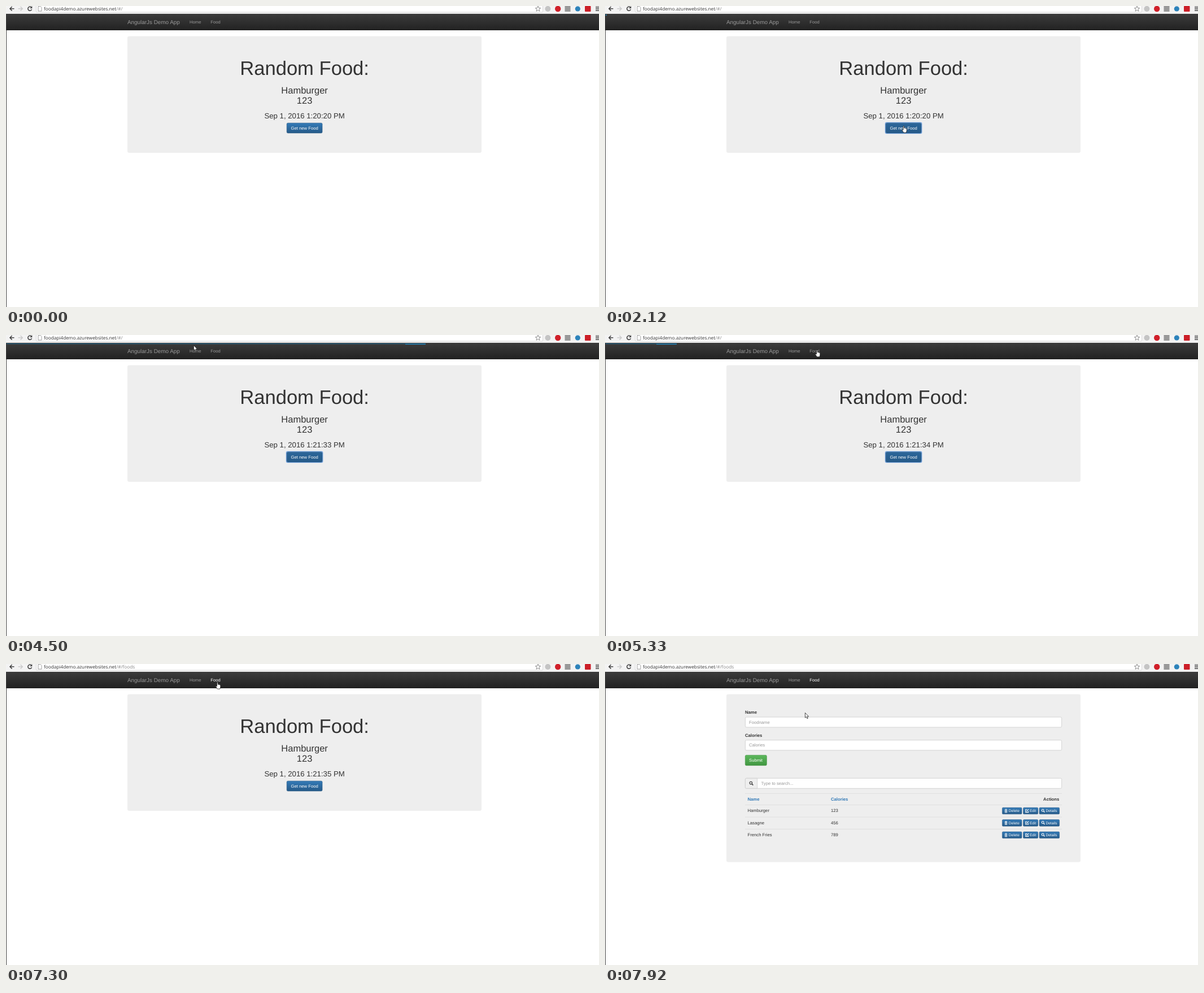
An HTML page that plays this animation: 1050 px wide and 533 px high, repeating every 8 s.

```html
<!DOCTYPE html>
<html lang="en">
<head>
<meta charset="utf-8">
<title>Food demo</title>
<style>
html, body { margin: 0; width: 100%; height: 100%; overflow: hidden; background: #fff; }
svg { display: block; width: 100%; height: 100%; }
text { font: 7.7px "Liberation Sans", Arial, sans-serif; fill: #333; text-rendering: geometricPrecision; white-space: pre; }
.url { font: 8.24px "Open Sans", sans-serif; }
.dim { fill: #999; }
.mid { text-anchor: middle; }
.end { text-anchor: end; }
.bold { font-weight: bold; }
.link { fill: #337ab7; }
.light { fill: #fff; }
.mini { font-size: 6.6px; fill: #fff; }
.field { fill: #fff; stroke: #ccc; stroke-width: .8; }
</style>
</head>
<body>
<svg viewBox="0 0 1050 533" xmlns="http://www.w3.org/2000/svg">
  <defs>
    <linearGradient id="nav" x2="0" y2="1"><stop stop-color="#3c3c3c"/><stop offset="1" stop-color="#222"/></linearGradient>
    <linearGradient id="blue" x2="0" y2="1"><stop stop-color="#337ab7"/><stop offset="1" stop-color="#265a88"/></linearGradient>
    <linearGradient id="deep" x2="0" y2="1"><stop stop-color="#2b669a"/><stop offset="1" stop-color="#265a88"/></linearGradient>
    <linearGradient id="green" x2="0" y2="1"><stop stop-color="#5cb85c"/><stop offset="1" stop-color="#419641"/></linearGradient>
    <g id="lens" fill="none"><circle cx="3" cy="3" r="2.3" stroke-width="1.2"/><path d="M4.8 4.8L7 7" stroke-width="1.6"/></g>
  </defs>
  <rect width="1050" height="533" fill="#fff"/>

  <!-- browser toolbar -->
  <rect width="1050" height="14" fill="#f3f3f3"/>
  <rect x="53.5" y="-4" width="897" height="15" rx="1.5" fill="#fff" stroke="#ccc" stroke-width=".7"/>
  <g fill="none" stroke-width="1.6">
    <path d="M14.5 4.8H7M10.6 1.2L7 4.8L10.6 8.4" stroke="#444"/>
    <path d="M21.5 4.8H29M25.6 1.2L29.2 4.8L25.6 8.4" stroke="#ccc"/>
    <path d="M45 2.4A3.5 3.5 0 1 0 45.6 6" stroke="#444"/>
    <path d="M57 .6H61L63 2.6V9H57Z" stroke="#888" stroke-width=".8"/>
    <path d="M942 .2L943.3 3.4L946.7 3.6L944 5.8L945 9.2L942 7.3L939 9.2L940 5.8L937.3 3.6L940.7 3.4Z" stroke="#777" stroke-width=".8"/>
    <path d="M1044 2H1050M1044 5H1050M1044 8H1050" stroke="#444" stroke-width="1.4"/>
  </g>
  <path d="M46.3 .3V4.2H42.4Z" fill="#444"/>
  <circle cx="959.4" cy="5" r="5" fill="#c4c4c4"/>
  <circle cx="977.2" cy="5" r="5.2" fill="#d0202a"/>
  <rect x="989.5" y="0" width="10" height="10" fill="#999"/>
  <circle cx="1012.3" cy="5" r="4.6" fill="#2d83ba"/>
  <rect x="1025" y="0" width="10.5" height="10" rx="1" fill="#cc1f28"/>
  <text class="url" x="67" y="7.9">foodapi4demo.azurewebsites.net<tspan id="path" fill="#888"></tspan></text>

  <!-- navigation -->
  <rect y="14" width="1050" height="28.5" fill="url(#nav)"/>
  <path d="M0 42.4H1050" stroke="#080808" stroke-width=".9"/>
  <path d="M0 14.3H1050" stroke="#222" stroke-width=".6"/>
  <text class="dim" x="215" y="32" style="font-size:9.9px">AngularJs Demo App</text>
  <text class="dim" x="325" y="31.4">Home</text>
  <text id="food" x="362.2" y="31.4">Food</text>
  <rect id="bar" x="0" y="15" height="1" fill="#1f6c96"/>
  <rect id="peg" y="15" width="36" height="2" fill="#257aa9"/>

  <rect id="panel" x="215" y="53.5" width="627" rx="3.3" fill="#eee"/>

  <g id="home">
    <text class="mid" x="528.6" y="122" style="font-size:34.6px">Random Food:</text>
    <text class="mid" x="528.6" y="154.6" style="font-size:16.5px">Hamburger</text>
    <text class="mid" x="528.6" y="172.8" style="font-size:16.5px">123</text>
    <text id="date" class="mid" x="528.6" y="198.8" style="font-size:13.2px"></text>
    <rect id="ring" x="496.4" y="206.4" width="64.4" height="19.2" rx="2" fill="none" stroke="#6c9fe0" stroke-width="1.2"/>
    <rect id="get" x="497.2" y="207.2" width="62.8" height="17.8" rx="2" stroke="#245580" stroke-width=".6"/>
    <text class="mid light" x="528.6" y="218.9">Get new Food</text>
  </g>

  <g id="foods">
    <text class="bold" x="248" y="88">Name</text>
    <rect class="field" x="248.4" y="94" width="560.2" height="18" rx="2"/>
    <text class="dim" x="255" y="105.8">Foodname</text>
    <text class="bold" x="248" y="128.7">Calories</text>
    <rect class="field" x="248.4" y="134.8" width="560.2" height="18" rx="2"/>
    <text class="dim" x="255" y="146.4">Calories</text>
    <rect x="248.3" y="161.4" width="38" height="18.3" rx="2" fill="url(#green)" stroke="#3e8f3e" stroke-width=".6"/>
    <text class="light" x="255" y="173.4">Submit</text>
    <rect class="field" x="248.4" y="202.3" width="560.2" height="18" rx="2"/>
    <path d="M269.6 202.3H250.4Q248.4 202.3 248.4 204.3V218.3Q248.4 220.3 250.4 220.3H269.6Z" fill="#eee" stroke="#ccc" stroke-width=".8"/>
    <use href="#lens" x="255.3" y="207.6" stroke="#444"/>
    <text class="dim" x="276.6" y="214.1">Type to search...</text>
    <path d="M248 229.3H809" stroke="#ddd" stroke-width=".9"/>
    <text class="bold link" x="252.5" y="242">Name</text>
    <text id="calories" class="bold link" y="242">Calories</text>
    <text class="bold end" x="804.3" y="242">Actions</text>
    <g id="rows"></g>
  </g>

  <path d="M.5 14V533" stroke="#444" stroke-width="1"/>
  <path id="arrow" d="M.4 .4V9.2L2.4 7.4L3.9 10.7L5.3 10.1L3.9 6.9H6.6Z" fill="#fff" stroke="#222" stroke-width=".8"/>
  <path id="hand" d="M2.5 8V1.4Q3.3 0 4.2 1.4V4.7Q5.2 4 5.8 5Q6.8 4.4 7.3 5.4Q8.6 5 8.8 6.3V9.5L7.8 12.7H3.4L.5 8.4Q.5 6.7 2.5 8Z" fill="#fff" stroke="#222" stroke-width=".8"/>
</svg>
<script>
const LOOP = 8000;
const el = id => document.getElementById(id);
const set = (id, attrs) => {
  for (const name in attrs) el(id).setAttribute(name, attrs[name]);
};
const show = (id, on) => set(id, { visibility: on ? "visible" : "hidden" });

// Latest [time, ...values] entry that has begun.
const latest = (keys, t) => keys.filter(k => k[0] <= t).pop();

const cursor = [
  [0, ""],
  [220, "arrow", 902, 478], [320, "arrow", 788, 414], [410, "arrow", 674, 349],
  [610, "arrow", 586, 250], [700, "arrow", 511, 162],
  [1030, "arrow", 515, 172], [1100, "arrow", 521, 184], [1170, "arrow", 528, 196], [1240, "arrow", 533, 205],
  [1420, "arrow", 529, 209], [1480, "hand", 525.5, 211.5],
  [4000, "arrow", 480, 150], [4080, "arrow", 390, 58], [4160, "arrow", 311, 0],
  [4410, "arrow", 318, 9], [4480, "arrow", 332, 18], [4550, "arrow", 346, 26],
  [4610, "arrow", 358, 31], [4680, "hand", 367, 29], [4750, "arrow", 373, 27],
  [4890, "hand", 372, 26],
  [6250, ""],
  [7020, "hand", 371, 31.5],
  [7620, ""],
  [7820, "arrow", 354, 86]
];
const progress = [
  [0, 0], [2120, 3], [2850, 195], [3580, 424], [4000, 590], [4160, 743],
  [4610, 327], [5330, 127], [5550, 0], [7820, 20], [7920, 0]
];
const clock = [[0, "20:20"], [2600, "21:33"], [4890, "21:34"], [5550, "21:35"]];

const trash = '<path d="M.6 1.5H5.4M2 1.2V.5H4V1.2M1.2 2.5V6.4H4.8V2.5ZM2.4 3V6M3.6 3V6" fill="none" stroke="#fff" stroke-width=".7"/>';
const pencil = '<path d="M5.5 3.8V6H.7V1.2H3.5M2.3 4.5L6.2 .6" fill="none" stroke="#fff" stroke-width="1.1"/>';
const lens = '<use href="#lens" transform="scale(.85)" stroke="#fff"/>';

const button = (x, y, width, label, icon) => `
  <rect x="${x}" y="${y}" width="${width}" height="11.6" rx="1.5" fill="url(#blue)" stroke="#245580" stroke-width=".5"/>
  <g transform="translate(${x + 3.6} ${y + 2.4})">${icon}</g>
  <text class="mini" x="${x + 11.4}" y="${y + 8.2}">${label}</text>`;

el("rows").innerHTML = [["Hamburger", 123], ["Lasagne", 456], ["French Fries", 789]].map(([name, kcal], i) => {
  const y = 249.6 + i * 21.4;
  return `<path d="M248 ${y}H809" stroke="#ddd" stroke-width=".9"/>
    <text x="252.5" y="${y + 12.7}">${name}</text>
    <text x="400" y="${y + 12.7}">${kcal}</text>` +
    button(703.4, y + 4.6, 34.6, "Delete", trash) +
    button(740.5, y + 4.6, 26.2, "Edit", pencil) +
    button(769, y + 4.6, 35.6, "Details", lens);
}).join("");

function draw(t) {
  const [, shape, x, y] = latest(cursor, t);
  for (const id of ["arrow", "hand"]) {
    show(id, id === shape);
    if (id === shape) set(id, { transform: `translate(${x} ${y})` });
  }

  const width = latest(progress, t)[1];
  set("bar", { width });
  set("peg", { x: Math.max(0, width - 36), width: Math.min(36, width) });

  const onFoods = t >= 7430, loaded = t >= 7920;
  show("home", !onFoods);
  show("foods", onFoods);
  show("rows", loaded);
  set("calories", { x: loaded ? 400 : 407.5 });
  set("panel", { height: loaded ? 297.3 : onFoods ? 233 : 206.5 });

  el("path").textContent = t >= 7120 ? "/#/foods" : "/#/";
  el("food").style.fill = t >= 7120 ? "#fff" : "#999";
  el("date").textContent = `Sep 1, 2016 1:${latest(clock, t)[1]} PM`;
  show("ring", t >= 2040 && t < 5780);
  set("get", { fill: t >= 1670 && t < 5780 ? "url(#deep)" : "url(#blue)" });
}

const start = performance.now();
function tick() {
  draw((performance.now() - start) % LOOP);
  requestAnimationFrame(tick);
}
draw(0);
requestAnimationFrame(tick);
</script>
</body>
</html>
```
